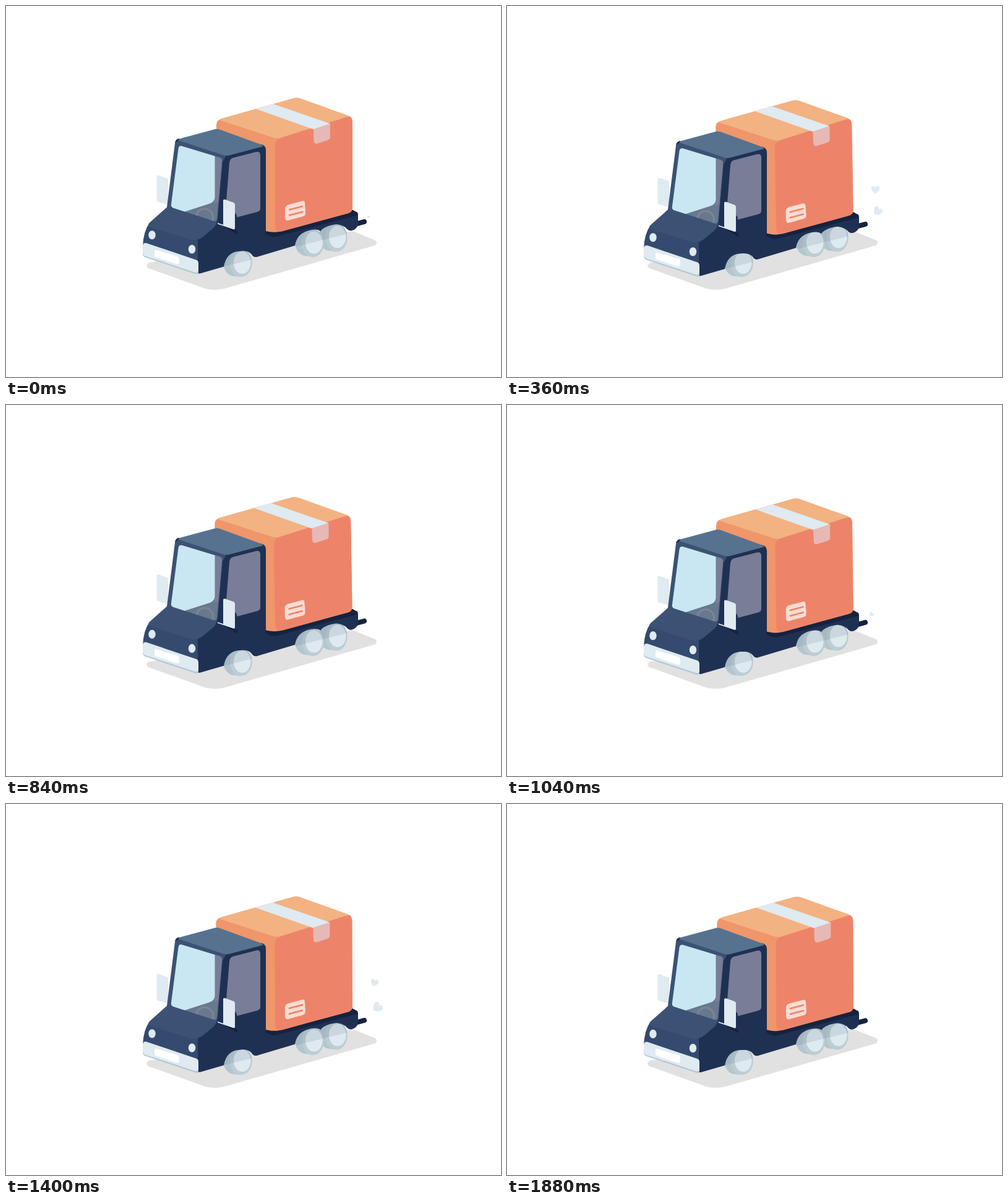
An HTML page that plays this animation: 800 px wide and 600 px high, repeating every 1920 ms.

```html
<!DOCTYPE html>
<html lang="en">
<head>
<meta charset="utf-8">
<title>Delivery truck</title>
<style>
  html, body { margin: 0; width: 100%; height: 100%; overflow: hidden; background: #fff; }
  svg { display: block; }
  .navy { fill: #1f3153; }
  .dark { fill: #15233f; }
  .pale { fill: #dfeaf1; }
</style>
</head>
<body>
<svg width="800" height="600" viewBox="0 0 800 600">
  <defs>
    <clipPath id="tires">
      <path d="M369 395 L380 394 A18 22 0 0 1 380 438 L369 437 A18 21 0 0 1 369 395Z"/>
      <path d="M485 362 L496 361 A18 22.500 0 0 1 496 406 L485 404 A18 21 0 0 1 485 362Z"/>
      <path d="M523 353 L534 351 A17.500 23 0 0 1 534 397.500 L523 396 A18 21.500 0 0 1 523 353Z"/>
    </clipPath>
    <clipPath id="glass">
      <path d="M284 226 L345 244.500 Q350 246 349 251 L341 343 Q340 349 335 347 L270 326 Q266 324 267 320 L278.500 231 Q279 225 284 226Z"/>
    </clipPath>
    <path id="heart" d="M0 .48 C-.2 .32 -.5 .1 -.5 -.17 C-.5 -.5 -.1 -.54 0 -.24 C.1 -.54 .5 -.5 .5 -.17 C.5 .1 .2 .32 0 .48Z"/>
  </defs>

  <path fill="#e1e1e1" d="M231 415 L560 364 L597 379 Q601 382 597 387 L353 457 Q338 461 322 457 L230 424 Q224 420 231 415Z"/>

  <g id="wheels"></g>
  <g clip-path="url(#tires)">
    <path class="bounce" fill="#1f3153" opacity=".1" d="M345 380 H400 V409 L345 423Z M460 340 H556 V367 L460 391Z"/>
  </g>

  <g id="hearts" class="pale"></g>

  <g class="bounce">
    <!-- chassis -->
    <path d="M566 352 L579 348.500" stroke="#15233f" stroke-width="8" stroke-linecap="round"/>
    <path class="navy" d="M400 358 L560 331 L567 333 Q569 334 569 337 V353 Q567 361 558 363 Q554 363 552 361 Q547 354 534 352.500 Q514 355 508 364 Q502 359 488 363 Q470 368 467 387 L405 405.500 Q400 406 397 401 Q391 394 376 396 Q356 398 351 421 L340 380Z"/>
    <path class="dark" d="M418 360 L560 329 L568 333.500 V338 L437 372.500 Q428 374 418 367Z"/>

    <g id="box">
      <path fill="#ef966a" d="M340 192 Q340 184 348 182 L464 149 Q471 147 478 150 L553 177 Q560 180 560 188 V326 Q560 333 552 335 L442 364.500 Q430 367 415 362 L340 300Z"/>
      <path fill="#f3b282" d="M345 184 Q346 182 350 181 L464 149 Q471 147 478 150 L552 176.500 Q556 178 555 179 L447 212 Q437 215 428 211Z"/>
      <path fill="#ed846a" d="M435 225 Q435 215 446 212 L551 179 Q560 176 560 188 V326 Q560 333 552 335 L446 364 Q440 365 438 363 Q435 360 435 352Z"/>
      <path class="pale" d="M404 166 L432 158 L524 190 L497 199Z"/>
      <path fill="#e6b9b6" d="M497 199 L524 190 V211 Q524 215 520 216.500 L503 222 Q498 223 497.500 218Z"/>
      <path fill="#fbdcd3" d="M451 328 Q451 323 456 321 L479 315 Q483 314 483 319 L484 334 Q484 339 479 340 L457 346 Q452 348 451 342Z"/>
      <path d="M458 329 L479 323.500 M458 338 L479 332.500" stroke="#ed846a" stroke-width="2.600" stroke-linecap="round"/>
    </g>

    <!-- cab -->
    <path class="pale" d="M247 273.500 L262 279 V321 L246 316.500 Q243.500 316 243.500 313 V276 Q243.500 272.500 247 273.500Z"/>
    <path class="navy" d="M346 238 L410 223.500 Q419 223 420 232 V364 L404 405 Q400 406 397 401 Q391 394 376 396 Q356 398 352 421 L314 432 Q309 433 305 428 V380 L338 340Z"/>
    <path fill="#344a6e" d="M232 350 L262 345 L310 370 V414 L221 388 Q222 364 232 350Z"/>
    <path fill="#3c5274" d="M273 222 Q274 215 280 214 L356 241 L350 252 L342 344 Q341 352 336 358 L318 373 Q309 380 298 377.500 L233 357 Q227 354.500 233 349 L260 325Z"/>
    <path class="navy" d="M273 221 Q274 215 279 214 L283 216 L276 219Z"/>
    <path fill="#56728f" d="M278 216.500 Q279 215 283 213.500 L335 199.500 Q340 197.500 346 199.500 L412 223.500 Q418 226 414 227 L361 241 Q355 242.500 349 240Z"/>
    <g clip-path="url(#glass)">
      <path fill="#68788f" d="M260 220 H355 V352 H260Z"/>
      <path fill="#7a7d97" d="M337 238 H352 V312 L337 319Z"/>
      <path fill="#c8e7f2" d="M262 218 H337.500 V309 Q337 317 328 319.500 L286 333 L262 325Z"/>
      <circle cx="321" cy="341" r="13.500" fill="none" stroke="#7d8594" stroke-width="3"/>
    </g>
    <path fill="#7a7d97" d="M367 245 L404 235.500 Q411 234 411 241 V327 Q411 331 406 332.500 L359 345 Q353 346 354 339 L361 253 Q362 246 367 245Z"/>
    <path class="navy" d="M370 334 Q374 337 373 343 L370 344Z"/>
    <path class="dark" d="M352 356 L374 363 V369Z"/>
    <path class="pale" d="M342 350 L351 353 V314 Q351 312 354 312.500 L368 317.500 Q370 318 370 321 V359 Q370 361.500 367 360.500 L342 352Z"/>
    <path class="navy" d="M343 345 L351 347 V353 L343 350.500Z"/>

    <!-- bumper and lights -->
    <path fill="#b3c8d4" d="M221 388 L310 414 Q311 416 311 420 V430 Q311 434 306 433 L225 406 Q221 404 221 400Z"/>
    <path class="pale" d="M221 387 Q222 382 227 383 L307 410 Q311 411 311 416 V427 Q310 431 306 430.500 L225 404 Q221 402 221 398Z"/>
    <path fill="#fff" d="M243 394 L277 404.500 Q280 405.500 280 409 V414 Q280 418 276 417 L243 406 Q240 405 240 402 V397 Q240 393 243 394Z"/>
    <g class="pale">
      <ellipse cx="236" cy="370" rx="5.700" ry="7.200"/>
      <ellipse cx="300.500" cy="393" rx="5.700" ry="7.200"/>
    </g>
  </g>
</svg>
<script>
const LOOP = 1920, STEP = 40;
const $ = id => document.getElementById(id);
const box = $("box"), hearts = $("hearts");
const bouncers = document.querySelectorAll(".bounce");

const ellipse = (x, y, rx, ry, fill) =>
  `<ellipse cx="${x}" cy="${y}" rx="${rx}" ry="${ry}" fill="${fill}"/>`;

// The back wheel of the pair comes first so the nearer one overlaps it.
$("wheels").innerHTML = `<g clip-path="url(#tires)">` +
  [[534, 374.5], [496, 383.5], [380, 416]].map(([x, y]) =>
    `<path fill="#b4c6cd" d="M${x - 11} ${y - 21.5} L${x} ${y - 23} V${y + 23} L${x - 11} ${y + 21.5} A18 21.5 0 0 1 ${x - 11} ${y - 21.5}Z"/>` +
    ellipse(x, y, 18, 23, "#bccdd4") +
    ellipse(x + 1.7, y - 1, 13.8, 18, "#dfeaf0")).join("") + `</g>`;

// Heart path: age in steps, x, y, size, tilt
const PATH = [
  [0, 584, 342, 2, 40],
  [0.7, 585.5, 341, 5, 40],
  [4.7, 598.5, 332, 14.5, 35],
  [5.7, 600, 329, 16.5, 45],
  [9.7, 595.5, 297, 13.5, 0],
  [10.7, 595.5, 289, 12.5, 14],
  [14.7, 609, 264, 8.5, 5],
  [15.7, 613, 257.5, 7.5, 20],
  [16.2, 614, 255, 6, 20]
];

function heart(age) {
  const i = PATH.findIndex(k => k[0] > age);
  if (i < 1) return "";
  const a = PATH[i - 1], b = PATH[i];
  const p = (age - a[0]) / (b[0] - a[0]);
  const [, x, y, size, tilt] = a.map((v, j) => v + (b[j] - v) * p);
  return `<use href="#heart" transform="translate(${x} ${y}) rotate(${tilt}) scale(${size})"/>`;
}

function draw(now) {
  const t = Math.floor(now % LOOP / STEP) * STEP; // 25 pictures per second
  const wave = turns => (1 - Math.cos(turns * 2 * Math.PI)) / 2;

  const y = 0.4 + 4 * wave(0.007025 * t);
  bouncers.forEach(el => el.setAttribute("transform", `translate(0 ${y})`));

  // The load leans about its base.
  const lean = 3 * wave(t / 240) / 180;
  box.setAttribute("transform", `matrix(1 0 ${lean} 1 ${-lean * 355} 0)`);

  // Two hearts leave the exhaust every second.
  const age = (t / STEP + 0.7) % 25;
  hearts.innerHTML = heart(age) + heart(age - 5);
  requestAnimationFrame(draw);
}
requestAnimationFrame(draw);
</script>
</body>
</html>
```
